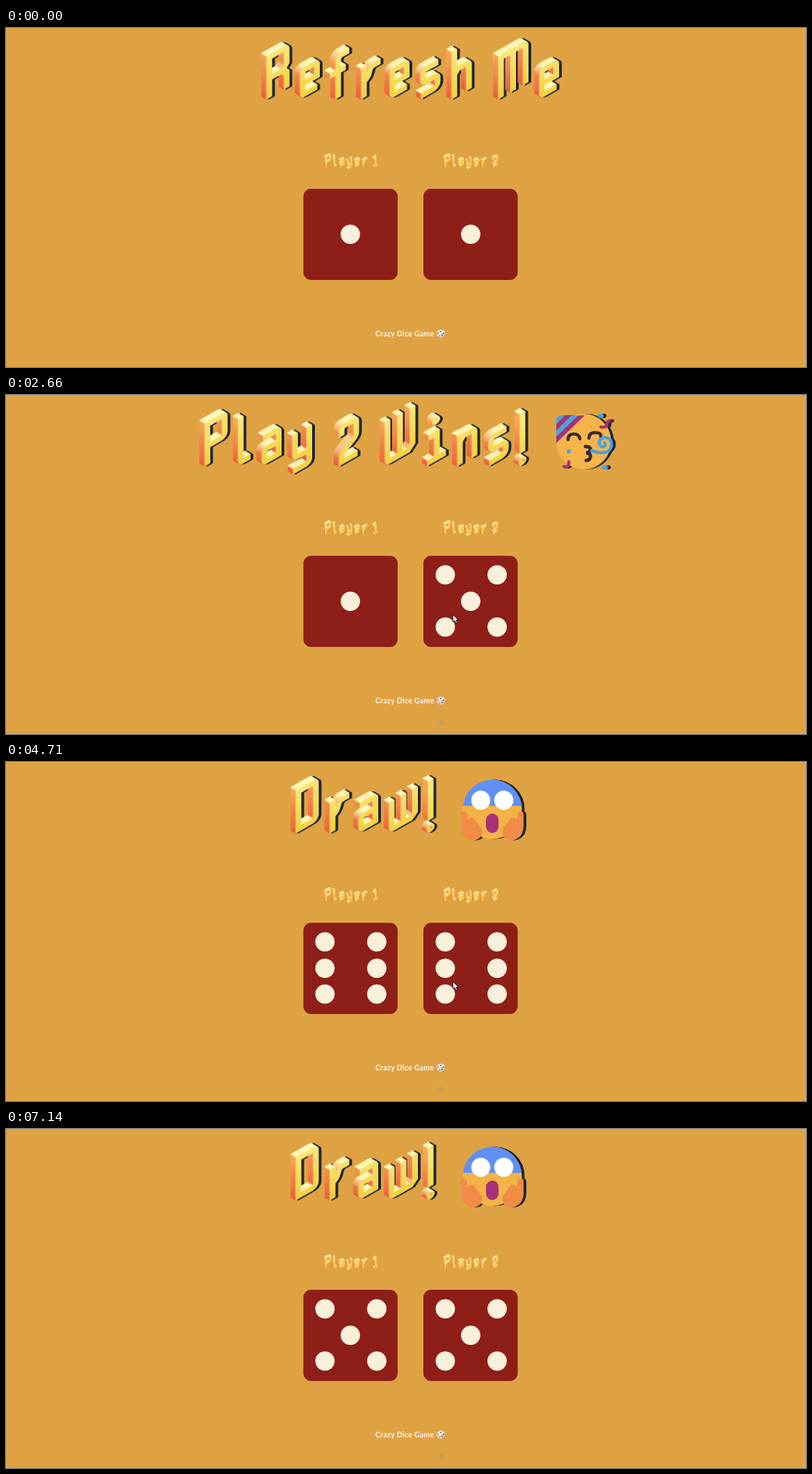
An HTML page with a canvas for the animation above (7.81 s loop, 1150 by 487 pixels).

```html
<!DOCTYPE html>
<html lang="en">
<head>
<meta charset="utf-8">
<title>Dice Game</title>
<style>
html, body { margin: 0; width: 100%; height: 100%; overflow: hidden; background: #dfa243; }
canvas { display: block; width: 1150px; height: 487px; }
</style>
</head>
<body>
<canvas id="stage" width="1150" height="487"></canvas>
<script>
const W = 1150, H = 487, LOOP = 7810;
const ctx = document.getElementById('stage').getContext('2d');

// Isometric letters: [advance, x shift, centre lines], y pointing up
const GLYPHS = {
  ' ': [23, 0, ''],
  P: [48, 0, 'M4 0V58H25Q29 58 29 54V33Q29 27 23 27H4'],
  R: [48, 0, 'M4 0V58H25Q29 58 29 54V35L23 28H4M23 28L29 22V0'],
  D: [49, 0, 'M4 0V58H25Q29 58 29 54V10Q29 4 23 4H4'],
  M: [59, 0, 'M4 0V58H35Q39.5 58 39.5 53V0M21.5 58V0'],
  W: [60, 0, 'M4 63V8Q4 4 9 4H34L40 10V63M22 63V4'],
  a: [44, 0, 'M2 39H20Q24.5 39 24.5 35V0M24.5 22H9Q4 22 4 17V9Q4 4 9 4H24.5'],
  e: [44, 0, 'M25 4H9Q4 4 4 9V34Q4 39 9 39H20Q24.5 39 24.5 35V20H4'],
  f: [44, 7, 'M4 0V51Q4 59 11 59H20M-8 38H15'],
  h: [44, 0, 'M4 0V68M4 32L10 39H20Q25 39 25 34V0'],
  i: [44, 0, 'M1 4H28M15 4V39H3M12.5 58a1.5 1.5 0 1 0 3 0a1.5 1.5 0 1 0-3 0'],
  l: [34, 0, 'M4 68V9Q4 4 9 4H18'],
  n: [45, 0, 'M4 0V44M4 32L10 39H20Q25 39 25 34V0'],
  r: [41, 0, 'M4 0V44M4 23Q10 24 12 32T21 39H28'],
  s: [45, 0, 'M1 4H18Q25 4 25 11V15Q25 21 18 21H10Q4 21 4 28V33Q4 39 10 39H26'],
  w: [56, 0, 'M4 44V8Q4 4 9 4H32L37.5 9V44M21 44V4'],
  y: [44, 0, 'M4 44V15Q4 10 9 10H24.5M24.5 44V-3Q24.5 -8 19 -8H1'],
  '1': [37, 0, 'M1 4H22M12 4V61M12 56L1 50'],
  '2': [43, 0, 'M4 41V48Q4 54 10 54H20Q25 54 25 49V34Q25 29 20 26L8 18Q4 15 4 10V4H27'],
  '!': [20, 0, 'M4 75V18M2.5 5.5a1.5 1.5 0 1 0 3 0a1.5 1.5 0 1 0-3 0']
};
for (const g of Object.values(GLYPHS)) g[2] = new Path2D(g[2]);

function ramp(c, low, high) {
  const g = c.createLinearGradient(0, 0, 0, 64);
  g.addColorStop(0, low);
  g.addColorStop(1, high);
  return g;
}

function drawGlyph(c, path, x, y, s) {
  const side = ramp(c, '#ec5c35', '#f8a64e');
  const front = ramp(c, '#f8d03a', '#fbe87a');
  const pen = (back, drop, width, color) => {
    c.setTransform(s, -0.57 * s, 0, -s, x + (7.5 - 7.5 * back) * s, y - (4.5 * back - drop) * s);
    c.lineWidth = width;
    c.strokeStyle = color;
    c.stroke(path);
  };
  // Stacked slices from back to front: pale tops, orange left walls
  const slices = 8;
  for (let i = slices; i > 0; i--) {
    pen(i / slices, 0, 8, '#fffabc');
    pen(i / slices, 1.1, 8, side);
  }
  pen(0, 0, 8, '#fff2a0');
  pen(0, 0, 6.8, front);
}

function canvas(w, h) {
  const cv = document.createElement('canvas');
  cv.width = w;
  cv.height = h;
  return cv;
}

// Words are painted four times larger and scaled down for clean edges
function drawWord(c, text, x, y, s) {
  const q = 4, w = 560 * s, h = 140 * s, left = 12 * s, foot = 110 * s;
  const big = canvas(w * q, h * q), b = big.getContext('2d');
  let at = left;
  for (const ch of text) {
    const [advance, shift, path] = GLYPHS[ch];
    if (ch !== ' ') drawGlyph(b, path, (at + shift * s) * q, foot * q, s * q);
    at += advance * s;
  }
  c.imageSmoothingQuality = 'high';
  c.drawImage(big, x - left, y - foot, w, h);
}

function shape(c, d, fill, stroke, width) {
  const p = new Path2D(d);
  if (fill) { c.fillStyle = fill; c.fill(p); }
  if (stroke) { c.strokeStyle = stroke; c.lineWidth = width; c.stroke(p); }
}

function oval(c, x, y, rx, ry, fill, turn = 0) {
  c.fillStyle = fill;
  c.beginPath();
  c.ellipse(x, y, rx, ry, turn, 0, Math.PI * 2);
  c.fill();
}

function box(c, x, y, w, h, r, fill) {
  c.fillStyle = fill;
  c.beginPath();
  c.roundRect(x, y, w, h, r);
  c.fill();
}

function mirror(c, axis, paint) {
  paint();
  c.save();
  c.translate(2 * axis, 0);
  c.scale(-1, 1);
  paint();
  c.restore();
}

function partyFace(c) {
  const dark = '#3b2a33', blue = '#4aa3de', pink = '#a9316f';
  c.lineCap = 'round';
  oval(c, 830.5, 67, 39.5, 40, '#f6b44a');
  c.save();
  c.beginPath();
  c.roundRect(791, 29.5, 60, 60, 6);
  c.clip();
  shape(c, 'M791 29H832L791 69Z', blue);
  shape(c, 'M791 42L804 29H813L791 51ZM791 60L823 29H832L791 69Z', pink);
  c.restore();
  shape(c, 'M808 64Q808 56 816 56T825 63M838 62Q838 54 847 54T855 60', null, dark, 4.5);
  shape(c, 'M833 74Q841 74 840 79Q839 83 834 83Q841 84 840 89Q839 94 834 94', null, dark, 5);
  shape(c, 'M842 80Q866 88 870 74Q872 62 861 61Q852 62 853 70Q855 76 860 74Q863 72 860 69', null, blue, 4.5);
  shape(c, 'M855 46Q863 47 864 43Q863 38 868 37M802 103Q810 105 809 96', null, pink, 4.5);
  oval(c, 809, 81, 3, 3, blue);
  oval(c, 855, 30, 4, 3.2, blue);
  oval(c, 861, 104, 4.5, 3, blue);
}

function coolFace(c) {
  c.lineCap = 'round';
  oval(c, 827.5, 68, 43, 42.5, '#f6b44a');
  shape(c, 'M811 77Q827 91 843 77', null, '#402f33', 5);
  shape(c, 'M821 44Q826 42 833 44', null, '#8459b5', 5);
  mirror(c, 826.75, () => shape(c,
    'M784 39Q789 36 803 37Q820 37 821 44Q821 69 804 69Q787 69 784 48Z', '#2e183f', '#8459b5', 4));
  for (const x of [811.5, 858.5]) oval(c, x, 46.5, 4.5, 6, '#fff', -0.6);
}

function shockFace(c) {
  oval(c, 699, 68, 42.5, 42.5, '#f4b346');
  c.save();
  c.beginPath();
  c.rect(650, 20, 100, 43);
  c.clip();
  oval(c, 699, 68, 42.5, 42.5, '#6090f4');
  c.restore();
  mirror(c, 699, () => {
    oval(c, 682.5, 55, 13.7, 13.7, '#fff');
    shape(c, 'M654 76Q654 71 658 71Q663 71 663 77V83L667 80Q672 78 674 83L683 95Q687 102 681 109Q674 115 665 111Q654 106 654 92Z', '#f18b45');
  });
  box(c, 690, 74, 18, 28, 9, '#a9317a');
}

function layer(paint) {
  const cv = canvas(W, H);
  paint(cv.getContext('2d'));
  return cv;
}

const title = (text, x, face) => layer(c => {
  drawWord(c, text, x, 102.5, 1);
  if (face) face(c);
});
const again = title('Refresh Me', 367, null);
const win2 = title('Play 2 Wins!', 278, partyFace);
const win1 = title('Play 1 Wins!', 281.5, coolFace);
const draw = title('Draw!', 409, shockFace);

const base = layer(c => {
  c.fillStyle = '#dfa243';
  c.fillRect(0, 0, W, H);
  drawWord(c, 'Player 1', 457, 200.5, 0.25);
  drawWord(c, 'Player 2', 628.5, 200.5, 0.25);
  for (const x of [427.5, 600]) box(c, x, 231, 135.5, 131, 11, '#8e1e18');
  c.fillStyle = '#fffaf0';
  c.font = '700 10.5px Lato, "Open Sans", sans-serif';
  c.letterSpacing = '0.3px';
  c.fillText('Crazy Dice Game', 531, 442.5);
  // small die beside the caption
  shape(c, 'M625 433L631 436L630 442L625 445L620 442L619 436Z', '#f3ece4', '#cfc3b8', 0.7);
  shape(c, 'M625 439L631 436L630 442L625 445Z', '#d2c8c0');
  for (const [x, y] of [[625, 436], [621, 438], [623.5, 442], [627, 441.5], [629, 438.5]]) {
    oval(c, x, y, 0.9, 0.9, '#6b5348');
  }
});

const SCENES = [
  [0, again, 1, 1],
  [1610, win2, 3, 4],
  [2660, win2, 1, 5],
  [3650, win1, 5, 2],
  [4710, draw, 6, 6],
  [5960, draw, 5, 5]
];
// cells of a 3 x 3 grid for each face
const FACES = ['', '4', '26', '246', '0268', '02468', '023568'];
const CLICKS = [[1330, 1530], [2390, 2590], [3450, 3650], [4440, 4710], [5700, 5900]];
const ENTRY = [[622, 463], [616, 420], [611, 376], [617, 345], [634, 325], [642, 315]];

function drawPips(x, face) {
  for (const n of FACES[face]) {
    const col = n % 3, row = Math.floor(n / 3);
    oval(ctx, x + [-36.5, 0, 38][col], 296.3 + [-38, 0, 37][row], 13.9, 13.9, '#f8f0da');
  }
}

function arrow(x, y, fill, line) {
  ctx.save();
  ctx.translate(x, y);
  shape(ctx, 'M.5 .5V11L3 9L4.7 12.8L6.6 12L5 8.3H8.2Z', fill, line, 1);
  ctx.restore();
}

function pointer(t) {
  if (t < 660 || t >= 7140) return null;
  if (t < 6310) return ENTRY[Math.min(5, Math.floor((t - 660) / 68))];
  const p = Math.min(1, Math.floor((t - 6310) / 69) / 11);
  return [687 + 417 * p, 326 + 160 * Math.pow(p, 1.35)];
}

function render(t) {
  const [, head, left, right] = SCENES.filter(s => s[0] <= t).pop();
  ctx.drawImage(base, 0, 0);
  ctx.save();
  ctx.shadowColor = '#222831';
  ctx.shadowOffsetX = 4;
  ctx.drawImage(head, 0, 0);
  ctx.restore();

  // faint trail left on the page
  if (t >= 728) arrow(622, 463, 'rgba(165,155,115,.5)');
  if (t >= 932 && t < 1610) oval(ctx, 619.5, 348.5, 3.5, 2.5, 'rgba(75,20,18,.3)');

  drawPips(495, left);
  drawPips(668, right);

  if (CLICKS.some(([a, b]) => t >= a && t < b)) oval(ctx, 641.5, 315.5, 8.5, 8.5, 'rgba(255,255,255,.35)');
  const at = pointer(t);
  if (at) arrow(at[0], at[1], '#fff', '#2a1a1a');
}

function tick() {
  render(performance.now() % LOOP);
  requestAnimationFrame(tick);
}
tick();
</script>
</body>
</html>
```
